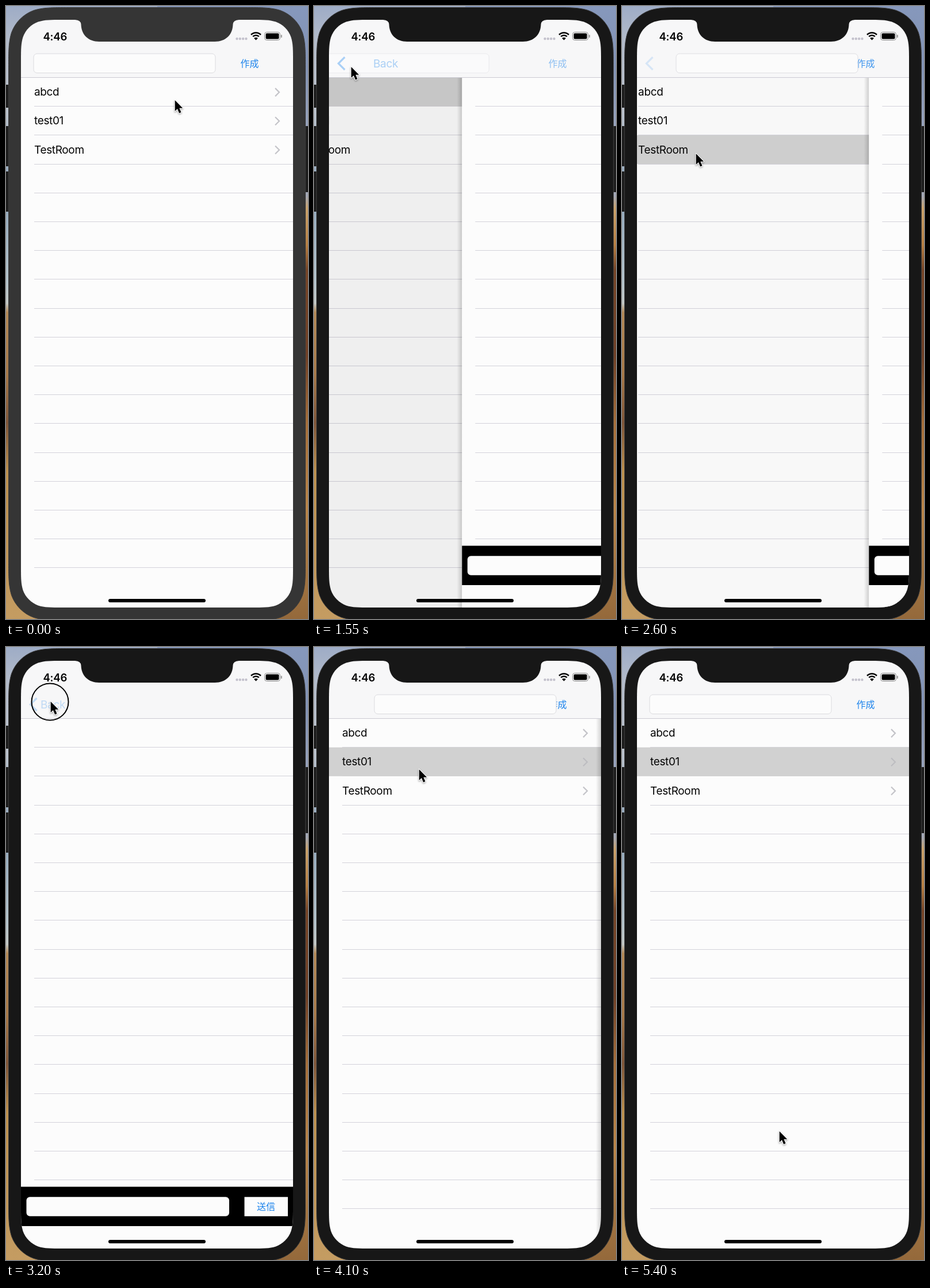
Recreate the animation shown at these times as an HTML page with a canvas. Size 525 by 1067 pixels, loop 5.45 s.

```html
<!DOCTYPE html>
<html lang="ja">
<head>
<meta charset="utf-8">
<style>
  html, body { margin: 0; width: 100%; height: 100%; overflow: hidden; }
  canvas { display: block; }
</style>
</head>
<body>
<canvas id="stage" width="525" height="1067"></canvas>
<script>
const g = document.getElementById('stage').getContext('2d');
const LOOP = 5450, STEP = 50;
const LEFT = 26, WIDTH = 473, TOP = 125, ROW = 50.2;
const BLUE = '#1b83ec', PAPER = '#fcfcfc';
const ROOMS = ['abcd', 'test01', 'TestRoom'];
const LATIN = 'Inter, "Open Sans", sans-serif';
const CJK = '"Noto Sans CJK JP", "Noto Sans CJK", sans-serif';

// Screen changes: opening a room (with its row) or going back
const MOVES = [
  { at: 499, room: 0 }, { at: 1460 },
  { at: 2563, room: 2 }, { at: 3290 },
  { at: 4100, room: 1 }, { at: 4860 }
];
// Pointer stops: time, x, y
const POINTER = [
  [0, 293, 163], [250, 296, 146], [750, 296, 146], [1300, 64, 105],
  [1650, 64, 105], [2350, 128, 256], [2650, 128, 256], [3050, 77, 94],
  [3400, 77, 94], [3900, 182, 212], [4200, 182, 212], [4650, 72, 97],
  [4900, 72, 97], [5350, 273, 842], [LOOP, 273, 842]
];

// Critically damped spring used by the page slide
function spring(ms) {
  const x = 0.01826 * ms;
  return ms > 500 ? 1 : 1 - (1 + x) * Math.exp(-x);
}

function rect(x, y, w, h, color) {
  g.fillStyle = color;
  g.fillRect(x, y, w, h);
}

function box(x, y, w, h, r, fill, stroke) {
  g.beginPath();
  g.roundRect(x, y, w, h, r);
  if (fill) { g.fillStyle = fill; g.fill(); }
  if (stroke) { g.strokeStyle = stroke; g.lineWidth = 1; g.stroke(); }
}

// Rectangle with continuous corners that flow gradually into the sides
function smoothBox(x, y, w, h, r) {
  const half = [
    [0, 1.528], [0, 1.088], [0, .868], [.075, .631], [.169, .373]
  ];
  const corner = half.concat(half.map(([a, b]) => [b, a]).reverse());
  const path = new Path2D();
  [[0, 0], [1, 0], [1, 1], [0, 1]].forEach(([right, low], i) => {
    const pts = corner.map(([a, b]) => [
      right ? x + w - a * r : x + a * r,
      low ? y + h - b * r : y + b * r
    ]);
    if (i % 2) pts.reverse();
    path.lineTo(...pts[0]);
    for (let k = 1; k < 10; k += 3)
      path.bezierCurveTo(...pts[k], ...pts[k + 1], ...pts[k + 2]);
  });
  path.closePath();
  return path;
}

const BODY = smoothBox(4.5, 2.5, 516, 1067, 69);
const SCREEN = smoothBox(LEFT, 24, WIDTH, 1023, 47.4);

function line(points, color, width) {
  g.beginPath();
  points.forEach(([x, y]) => g.lineTo(x, y));
  g.strokeStyle = color;
  g.lineWidth = width;
  g.stroke();
}

function text(str, x, y, font, color, spacing = 0) {
  g.font = font;
  g.letterSpacing = spacing + 'px';
  g.fillStyle = color;
  g.fillText(str, x, y);
}

function faded(alpha, draw) {
  g.save();
  g.globalAlpha *= alpha;
  draw();
  g.restore();
}

function blend(x0, y0, x1, y1, stops) {
  const b = g.createLinearGradient(x0, y0, x1, y1);
  stops.forEach(([at, color]) => b.addColorStop(at, color));
  return b;
}

function desktop() {
  rect(0, 0, 263, 1067, blend(0, 0, 0, 1067, [
    [0, '#9eacc6'], [.06, '#b4bcca'], [.17, '#bcc3cd'], [.3, '#8fa5ba'],
    [.45, '#b5c4cc'], [.485, '#c3c8c6'], [.5, '#b48a58'], [.6, '#a87a4a'],
    [.68, '#80573a'], [.76, '#bd914f'], [1, '#c49c62']]));
  rect(263, 0, 262, 1067, blend(0, 0, 0, 1067, [
    [0, '#8698bc'], [.1, '#8292b4'], [.2, '#98a3bb'], [.31, '#a3a8b6'],
    [.33, '#c9a26c'], [.39, '#b67f43'], [.43, '#754528'], [.57, '#6f4027'],
    [.68, '#a56f3b'], [.82, '#b98549'], [1, '#94693b']]));
}

function phone(color) {
  [[0, 137, 40], [0, 209, 70], [0, 288, 70], [517, 209, 115]]
    .forEach(([x, y, h]) => rect(x, y, 8, h, '#1d1d1d'));
  g.fillStyle = color;
  g.fill(BODY);
  g.strokeStyle = '#3c3c3c';
  g.lineWidth = 1;
  g.stroke(BODY);
}

function separators(x, count) {
  for (let i = 1; i <= count; i++)
    rect(x + 23, Math.round(TOP + ROW * i) - 1, WIDTH, 1, '#d3d2da');
}

function list(x, selected, dim) {
  rect(x, TOP, WIDTH, 922, PAPER);
  separators(x, 17);
  if (selected >= 0) rect(x, TOP + ROW * selected - .5, WIDTH, ROW, '#d1d1d1');
  ROOMS.forEach((name, i) => {
    const y = TOP + ROW * (i + .5);
    text(name, x + 23, y + 6, '19px ' + LATIN, '#050505', -.35);
    line([[x + 442, y - 7], [x + 449, y], [x + 442, y + 7]],
      i === selected ? '#bdbdc1' : '#c4c4c9', 2.2);
  });
  rect(LEFT, TOP, WIDTH, 922, `rgba(0,0,0,${.1 * dim})`);
}

function chat(x) {
  rect(x - 9, TOP, 9, 922, blend(x - 9, 0, x, 0,
    [[0, 'rgba(0,0,0,0)'], [1, 'rgba(0,0,0,.17)']]));
  rect(x, TOP, WIDTH, 922, PAPER);
  separators(x, 16);
  rect(x, 939.5, WIDTH, 68.5, '#000');
  box(x + 9.5, 957.3, 352.5, 33.5, 6, PAPER);
  rect(x + 388.5, 957.3, 75.5, 33.5, PAPER);
  text('送信', x + 410, 980, '16px ' + CJK, BLUE);
}

function statusBar() {
  text('4:46', 64.5, 59.5, '600 18.5px ' + LATIN, '#000', -.2);
  g.fillStyle = '#c4c2cd';
  for (let i = 0; i < 4; i++) {
    g.beginPath();
    g.arc(401.5 + i * 5.3, 57, 2.2, 0, 7);
    g.fill();
  }
  const a = Math.PI * 1.25, b = Math.PI * 1.75;
  [12, 7.5].forEach(r => {
    g.beginPath();
    g.arc(434.5, 58.5, r, a, b);
    g.strokeStyle = '#000';
    g.lineWidth = 2.6;
    g.stroke();
  });
  g.beginPath();
  g.moveTo(434.5, 59.5);
  g.arc(434.5, 59.5, 4.8, a, b);
  g.fillStyle = '#000';
  g.fill();
  box(449.5, 45.5, 27, 14, 4, null, '#8b8b8b');
  box(451.5, 47.5, 23, 10, 2, '#000');
  box(478, 50, 1.7, 5, 1, '#8b8b8b');
}

function navBar(open, pushing, moving, pressed) {
  rect(LEFT, 24, WIDTH, 101, '#f7f7f8');
  rect(LEFT, 124, WIDTH, 1, '#cbcad3');
  statusBar();
  faded(1 - open, () => {
    text('作成', 407.5, 106, '16px ' + CJK, BLUE);
    const shift = !moving ? 0
      : pushing ? 57 - 68 * open - 42 * open * open : -117 * open;
    box(48 + shift, 83, 316, 33.5, 6, PAPER, '#dadade');
  });
  faded(pressed ? .25 : pushing ? open : .7 * open, () => {
    line([[53.5, 89], [42.5, 100], [53.5, 111]], BLUE, 3.2);
    const shift = (pushing ? 117 : 88) * (1 - open);
    if (open > .2)
      text('Back', 60 + shift, 106.5, '19px ' + LATIN, BLUE, -.35);
  });
}

function notch(color) {
  g.beginPath();
  g.moveTo(120, 22);
  g.lineTo(120, 24);
  g.quadraticCurveTo(130, 24.5, 130.5, 32);
  g.bezierCurveTo(131, 50, 143, 62, 162, 62);
  g.lineTo(363, 62);
  g.bezierCurveTo(382, 62, 394, 50, 394.5, 32);
  g.quadraticCurveTo(395, 24.5, 405, 24);
  g.lineTo(405, 22);
  g.fillStyle = color;
  g.fill();
}

function pointer(t, ring) {
  const i = POINTER.findIndex(p => p[0] > t);
  const [t0, x0, y0] = POINTER[i - 1], [t1, x1, y1] = POINTER[i];
  const u = (t - t0) / (t1 - t0), k = u * u * (3 - 2 * u);
  const x = x0 + (x1 - x0) * k, y = y0 + (y1 - y0) * k;
  if (ring) {
    g.beginPath();
    g.arc(x - .5, y + 1.5, 32, 0, 7);
    g.strokeStyle = '#000';
    g.lineWidth = 2;
    g.stroke();
  }
  g.save();
  g.translate(x + .7, y + 1);
  g.scale(.9, .9);
  g.beginPath();
  [[0, 0], [0, 21], [4.7, 16.8], [8.2, 25], [12, 23.4], [8.5, 15.4], [15, 15.2]]
    .forEach(([px, py]) => g.lineTo(px, py));
  g.closePath();
  g.shadowColor = 'rgba(0,0,0,.35)';
  g.shadowBlur = 3;
  g.shadowOffsetY = 1.5;
  g.strokeStyle = '#fff';
  g.lineWidth = 2.4;
  g.lineJoin = 'round';
  g.stroke();
  g.shadowColor = 'transparent';
  g.fillStyle = '#000';
  g.fill();
  g.restore();
}

function draw(t) {
  const move = MOVES.filter(m => m.at <= t).pop();
  const pushing = !!move && 'room' in move;
  const p = move ? spring(t - move.at) : 1;
  const open = pushing ? p : 1 - p;
  const moving = p < 1;
  const next = MOVES.find(m => m.at > t);
  const wait = next ? next.at - t : LOOP;
  const ring = wait > 25 && wait <= 125;
  const chosen = MOVES.filter(m => 'room' in m && m.at - 60 <= t).pop();
  const body = t < STEP ? '#353535' : '#171717';

  desktop();
  phone(body);
  g.save();
  g.clip(SCREEN);
  if (open < 1) list(LEFT - .3 * WIDTH * open, chosen ? chosen.room : -1, open);
  if (open > 0 || moving) chat(LEFT + WIDTH * (1 - open));
  navBar(open, pushing, moving, ring && pushing);
  g.restore();
  notch(body);
  box(178, 1032, 169, 6, 3, '#000');
  pointer(t, ring);
}

function tick(now) {
  draw(Math.floor(now % LOOP / STEP) * STEP);
  requestAnimationFrame(tick);
}
requestAnimationFrame(tick);
</script>
</body>
</html>
```
